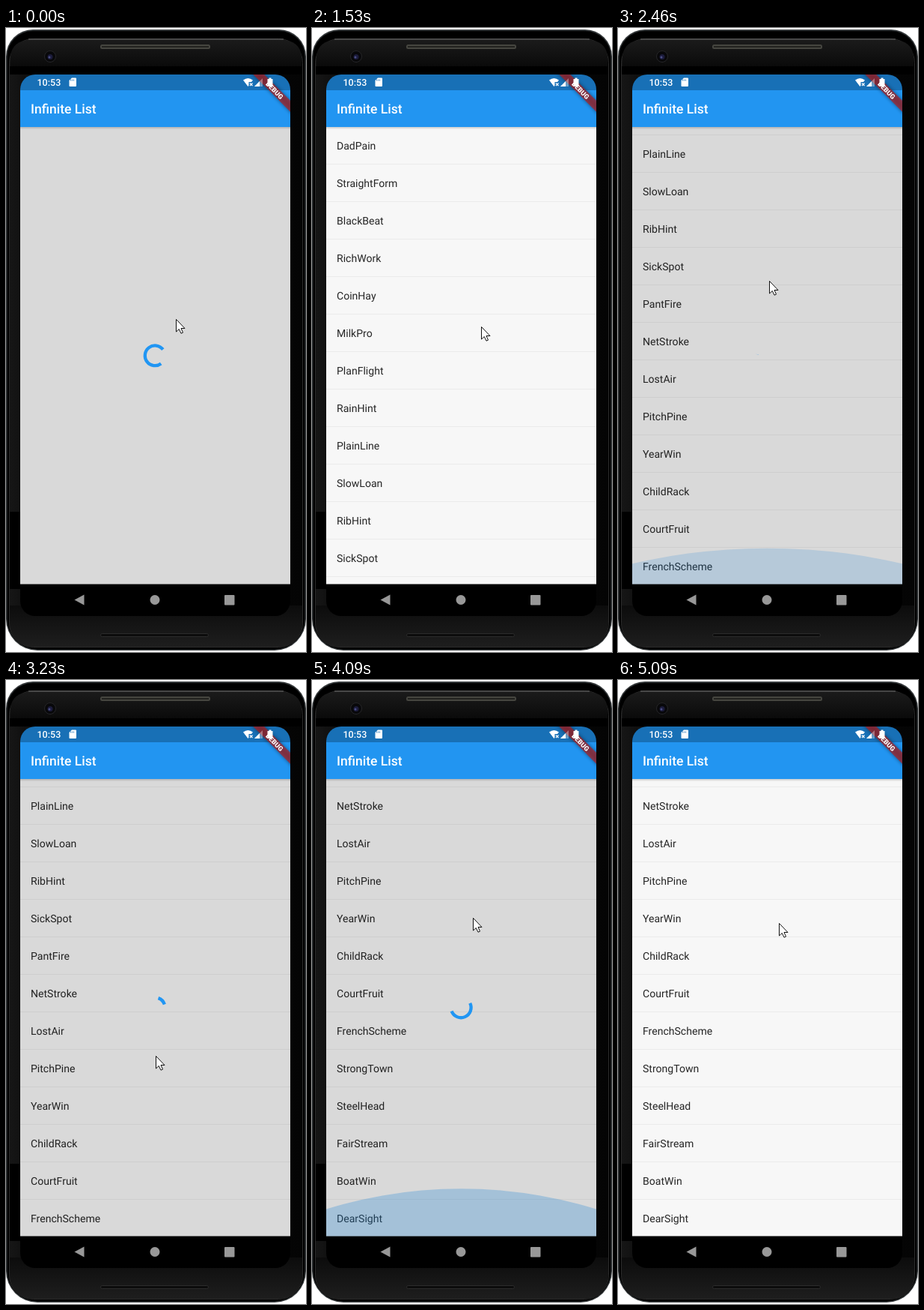
Write an HTML page that moves like this. It is 401 by 832 pixels and loops after 5.47 s.

```html
<!DOCTYPE html>
<html lang="en">
<head>
<meta charset="utf-8">
<title>Infinite List</title>
<style>
html, body { margin: 0; width: 100%; height: 100%; overflow: hidden; background: #fff; }
svg { display: block; width: 401px; height: 832px; font-family: Roboto, sans-serif; text-rendering: geometricPrecision; }
</style>
</head>
<body>
<svg viewBox="0 0 401 832">
  <defs>
    <linearGradient id="face" x2="1" y2="0">
      <stop offset="0" stop-color="#161616"/><stop offset=".05" stop-color="#101010"/>
      <stop offset=".5" stop-color="#0c0c0c"/><stop offset="1" stop-color="#040404"/>
    </linearGradient>
    <linearGradient id="brow" x2="0" y2="1">
      <stop offset="0" stop-color="#1b1b1b"/><stop offset="1" stop-color="#0a0a0a"/>
    </linearGradient>
    <linearGradient id="chin" x2="0" y2="1">
      <stop offset="0" stop-color="#0c0c0c"/><stop offset="1" stop-color="#1e1e1e"/>
    </linearGradient>
    <linearGradient id="shade" x2="0" y2="1">
      <stop offset="0" stop-opacity=".17"/><stop offset="1" stop-opacity="0"/>
    </linearGradient>
    <clipPath id="screen"><rect x="19" y="62" width="361" height="722" rx="20"/></clipPath>
    <clipPath id="view"><rect x="19" y="132" width="361" height="609.500"/></clipPath>
    <filter id="blur" x="-20%" y="-60%" width="140%" height="220%"><feGaussianBlur stdDeviation="2.5"/></filter>
  </defs>

  <!-- phone body -->
  <path d="M0 38A36 36 0 0 1 36 2H365A36 36 0 0 1 401 38V788A42 42 0 0 1 359 830H42A42 42 0 0 1 0 788Z" fill="#34383a"/>
  <path d="M1.500 38A34 34 0 0 1 36 4H365A34 34 0 0 1 399.500 38V788A40 40 0 0 1 359 828.500H42A40 40 0 0 1 1.500 788Z"/>
  <rect x="4.500" y="14.500" width="392" height="811" rx="32" fill="url(#face)" stroke="#2b2b2b"/>
  <path d="M30 15H371" stroke="#777"/>
  <path d="M6 51V38Q8 17 32 16H369Q393 17 395 38V51Z" fill="url(#brow)"/>
  <path d="M5 51H396V62H5Z"/>
  <path d="M5 645H19V748H5Z"/>
  <path d="M5 770H396V793Q394 825 364 825H37Q7 825 5 793Z" fill="url(#chin)"/>
  <rect x="126" y="22" width="147" height="6" rx="2.500" fill="#45453f"/>
  <path d="M128 25H271" stroke="#22221f" stroke-width="2"/>
  <rect x="126.500" y="807.500" width="144" height="4" rx="2" fill="#0c0c0c" stroke="#2c2c2c"/>
  <circle cx="59" cy="38" r="7.500" fill="#08080a" stroke="#262628"/>
  <circle cx="59" cy="38.500" r="3.500" fill="#1c1c3c"/>
  <circle cx="58" cy="39" r="1.500" fill="#4b4f86"/>

  <g clip-path="url(#screen)">
    <path d="M19 62H380V784H19Z"/>
    <g clip-path="url(#view)">
      <path d="M19 132H380V742H19Z" fill="#f7f7f7"/>
      <g id="rows" font-size="14.050" fill="#262626"></g>
      <ellipse id="glow" cx="199.500" rx="541" fill="#2196f3"/>
      <path d="M19 132H380V135.500H19Z" fill="url(#shade)"/>
      <g id="loader">
        <path d="M19 132H380V742H19Z" opacity=".12"/>
        <path id="arc" fill="none" stroke="#2196f3" stroke-width="4.300"/>
      </g>
    </g>

    <path d="M19 62H380V83H19Z" fill="#1870b6"/>
    <path d="M19 83H380V132H19Z" fill="#2295f1"/>
    <text x="33" y="113.800" font-size="17.560" font-weight="500" fill="#fff">Infinite List</text>

    <g transform="translate(380 62) rotate(45)">
      <rect x="-40" y="24.600" width="80" height="10.500" opacity=".45" filter="url(#blur)"/>
      <rect x="-40" y="24.600" width="80" height="10.500" fill="#b71c1c" fill-opacity=".66"/>
      <text y="33" font-size="8.960" font-weight="900" text-anchor="middle" fill="#fff">DEBUG</text>
    </g>

    <!-- status icons -->
    <g fill="#fff">
      <text x="41.500" y="77" font-size="12.500" font-weight="500">10:53</text>
      <path d="M88 66.500H93Q94 66.500 94 67.500V77Q94 78 93 78H85.500Q84.500 78 84.500 77V70Z"/>
      <path d="M317 69.500Q323.500 64.500 330 69.500L328 72H324.500V76.500L323.500 78Z"/>
      <path d="M326 73.500L329.500 77M329.500 73.500L326 77" stroke="#fff" stroke-width="1.200"/>
      <path d="M332 78L343 67V78Z" opacity=".35"/>
      <path d="M332 78L339 71V78Z"/>
      <path d="M351.500 66.500H354.500V68H356.500V78H349.500V68H351.500Z"/>
    </g>
    <path d="M86.500 68.500V70.500M88.500 68.500V70.500M90.500 68.500V70.500" stroke="#1870b6" stroke-width=".8"/>

    <!-- navigation bar -->
    <g fill="#989898">
      <path d="M91.500 762.500L104.500 755.500V769.500Z"/>
      <circle cx="199" cy="762.500" r="6.500"/>
      <rect x="292" y="756" width="13.500" height="13.500" rx="1"/>
    </g>
  </g>

  <g id="cursor">
    <path d="M0 0V16.500L3.800 13L6.500 18.700L9 17.600L6.500 12H11.500Z" fill="#fff" stroke="#111"/>
    <circle id="press" r="12" fill="#ff0" opacity=".5"/>
  </g>
</svg>

<script>
const LOOP = 5470;
const names = ('DadPain StraightForm BlackBeat RichWork CoinHay MilkPro PlanFlight RainHint PlainLine ' +
  'SlowLoan RibHint SickSpot PantFire NetStroke LostAir PitchPine YearWin ChildRack CourtFruit ' +
  'FrenchScheme StrongTown SteelHead FairStream BoatWin DearSight').split(' ');

// The picture advances in even steps within each [start, end, count]
const ticks = [0, ...[[70, 450, 6], [1530, 2070, 8], [2150, 2690, 8], [2760, 3310, 8],
  [3540, 4010, 7], [4090, 4630, 8], [4700, 5090, 6]].flatMap(([a, b, n]) =>
  Array.from({ length: n }, (_, i) => Math.floor((a + (b - a) * i / (n - 1)) / 10) * 10))];

const scrollKeys = [[2070, 0], [2150, 130], [2220, 323], [2300, 389],
  [3770, 389], [3850, 443], [3930, 525], [4010, 600], [4090, 639]];
const cursorKeys = [[1460, 228, 388], [1610, 225, 410], [1920, 207, 535], [2070, 203, 564],
  [2150, 204, 430], [2220, 204, 275], [2300, 204, 252], [2380, 204, 275], [2610, 201, 480],
  [2690, 201, 501], [3460, 201, 501], [3690, 214, 577], [3770, 218, 591], [3850, 218, 531],
  [3930, 218, 440], [4010, 217, 350], [4090, 216, 317], [4310, 216, 324]];
const loads = [[-1, 450], [2300, 3310], [4090, 5090]];
const presses = [[2150, 2220], [3770, 4010]];
const impacts = [2225, 4015];

const el = id => document.getElementById(id);
const set = (id, attrs) => { for (const k in attrs) el(id).setAttribute(k, attrs[k]); };
const show = (id, on) => set(id, { visibility: on ? 'visible' : 'hidden' });
const within = (t, spans) => spans.some(([a, b]) => t >= a && t < b);
const clamp = x => Math.min(1, Math.max(0, x));

el('rows').innerHTML = names.map((name, i) => {
  const y = 132 + 50 * i;
  return `<text x="33" y="${y + 29.5}">${name}</text><path d="M19 ${y + 49}h361v1h-361z" fill="#eaeaea"/>`;
}).join('');

function track(keys, t) {
  const i = keys.findIndex(k => k[0] > t);
  if (i < 0) return keys[keys.length - 1].slice(1);
  if (i === 0) return keys[0].slice(1);
  const [a, b] = [keys[i - 1], keys[i]];
  const u = (t - a[0]) / (b[0] - a[0]);
  return a.slice(1).map((v, j) => v + (b[j + 1] - v) * u);
}

// cubic-bezier(.4, 0, .2, 1)
function ease(x) {
  let lo = 0, hi = 1, s;
  for (let i = 0; i < 20; i++) {
    s = (lo + hi) / 2;
    if (1.2 * s * (1 - s) ** 2 + .6 * s * s * (1 - s) + s ** 3 < x) lo = s; else hi = s;
  }
  return 3 * s * s * (1 - s) + s ** 3;
}

function arcPath(t) {
  const turn = (t * 1.02 + 468) / 1000 % 5;
  const step = Math.floor(turn), p = turn - step;
  const head = ease(clamp(p * 2)), tail = ease(clamp(p * 2 - 1));
  const from = Math.PI * (-.5 + 1.5 * tail + 1.7 * p - .8 * step);
  const sweep = Math.max(1.5 * Math.PI * (head - tail), .01);
  const at = a => `${199.2 + 13.4 * Math.cos(a)} ${436.8 + 13.4 * Math.sin(a)}`;
  return `M${at(from)}A13.4 13.4 0 ${sweep > Math.PI ? 1 : 0} 1 ${at(from + sweep)}`;
}

function drawGlow(t) {
  const age = t - (impacts.filter(i => i <= t).pop() ?? -1e4);
  const fade = (1 - clamp((age - 115) / 600)) ** 2;
  const size = (1 - (1 - clamp(age / 115)) ** 2) * fade;
  set('glow', { cy: 742 + (541 - 72.5) * size, ry: 541 * size, opacity: .28 * fade });
}

function draw(t) {
  const [scroll] = track(scrollKeys, t);
  const [x, y] = track(cursorKeys, t);
  set('rows', { transform: `translate(0 ${-Math.round(scroll)})` });
  set('cursor', { transform: `translate(${Math.round(x) - .5} ${Math.round(y) + .5})` });
  set('arc', { d: arcPath(t) });
  show('rows', t >= 450);
  show('loader', within(t, loads));
  show('press', within(t, presses));
  drawGlow(t);
}

const start = performance.now();
function frame() {
  const now = (performance.now() - start) % LOOP;
  draw(ticks.filter(k => k <= now).pop());
  requestAnimationFrame(frame);
}
frame();
</script>
</body>
</html>
```
